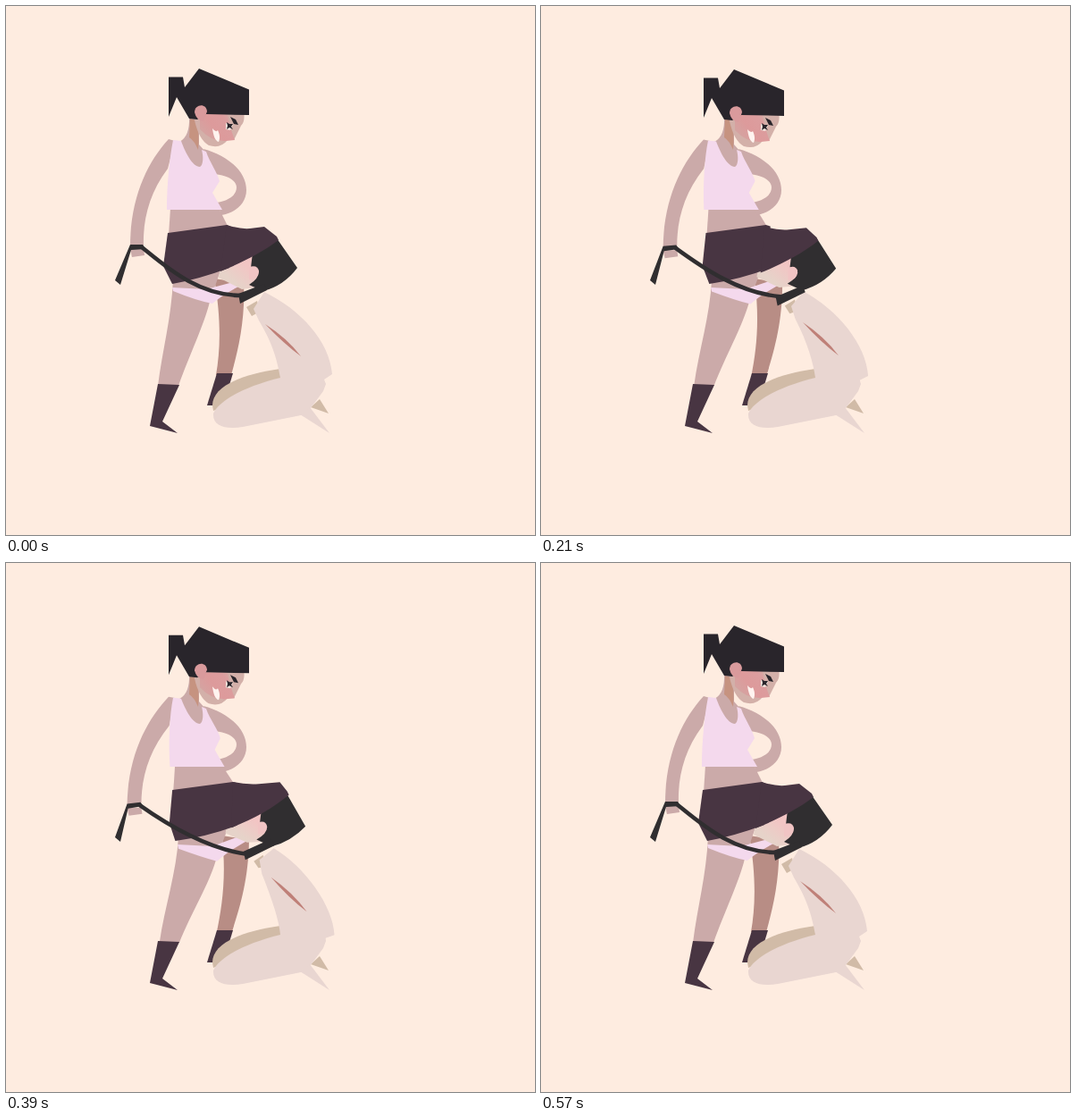
These frames come from a looping animation (592x592 px, 0.6 s). An HTML page:

```html
<!DOCTYPE html>
<html lang="en">
<head>
<meta charset="utf-8">
<style>
html, body { margin: 0; width: 100%; height: 100%; overflow: hidden; background: #feece0; }
svg { display: block; width: 100%; height: 100%; }
</style>
</head>
<body>
<svg id="stage" viewBox="0 0 592 592">
  <defs>
    <linearGradient id="blush" x1="0" y1="0.7" x2="1" y2="0.1">
      <stop offset="0" stop-color="#d3a5a2"/>
      <stop offset="0.4" stop-color="#dd9a9b"/>
      <stop offset="0.75" stop-color="#dc9d9e"/>
      <stop offset="1" stop-color="#d3b0a9"/>
    </linearGradient>
    <linearGradient id="cheek" x1="0" y1="1" x2="1" y2="0">
      <stop offset="0.25" stop-color="#e6d3c9"/>
      <stop offset="0.6" stop-color="#f2c5c4"/>
    </linearGradient>
  </defs>
</svg>
<script>
const LOOP = 600, STEP = 30;
const SKIN = '#cbaaa9', DARK = '#483542', HAIR = '#29252b', TOP = '#f4d9ed';
const PALE = '#e9d6d1', SHADE = '#d1bba7', BLACK = '#302e30';
const stage = document.getElementById('stage');
const parts = [];

function make(attrs, parent = stage) {
  const el = document.createElementNS('http://www.w3.org/2000/svg', 'path');
  for (const key in attrs) el.setAttribute(key, attrs[key]);
  parent.appendChild(el);
  return el;
}

const numbers = d => d.match(/-?[\d.]+/g).map(Number);

// A shape blends from one path to another, driven by the hips or the head;
// drop is how far it sinks while the head is low.
function shape(fill, from, to, driver = 'hips', { drop = 0, ...attrs } = {}) {
  const el = make({ d: from, fill, ...attrs });
  if (to) parts.push({ el, from, a: numbers(from), b: numbers(to), driver, drop });
}

// Far leg
shape('#b88d85', 'M233 305C241 350 240 385 235 413L252 413C260 385 268 350 266 310Z',
  'M243 305C248 350 242 385 236 413L253 413C262 385 272 355 273 310Z');
shape(DARK, 'M236 411L254 411L243 447L225 447Z');

// Near leg and underwear
shape(SKIN, 'M187 306C185 350 175 385 170 425L193 425C205 391 222 356 228 331L240 296Z',
  'M194 306C192 345 178 385 172 425L194 425C208 391 228 360 236 333L250 296Z');
shape(DARK, 'M170 423L194 424L175 465L192 478L161 470Z');
shape(TOP, 'M186 315L224 317L262 307L272 308Q245 321 231 333Q214 330 187 319Z',
  'M193 315L232 317L268 303L280 306Q252 320 237 334Q222 330 194 320Z');

// Torso and arms
shape(SKIN, 'M184 226L238 226L249 248L182 257Z', 'M190 226L242 226L257 248L188 257Z');
shape(SKIN, 'M182 149C158 175 139 215 139 269L154 269C153 240 160 210 181 182L189 151Z',
  'M182 150C158 175 136 215 135 271L151 271C151 240 160 210 183 182L189 151Z');
shape(SKIN, 'M139 272L141 281L155 279L154 272Z', 'M135 274L137 283L152 281L151 274Z');
shape(SKIN, 'M221 160C250 168 269 186 269 206C269 222 255 232 241 234L236 220C252 217 258 210 258 203C258 196 250 190 234 188Z');
shape(SKIN, 'M194 152Q206 146 205 124L216 126L216 155L224 164L220 181L211 181L199 168Z');
shape('#c69380', 'M206 126L213 128Q217 142 215 161Q211 151 205 147Z');
shape(TOP, 'M187 150L196 151C201 165 209 180 217 180C221 178 221 168 219 161L224 163C228 175 236 185 239 196L231 209L242 228L180 228C180 200 183 170 187 150Z',
  'M187 151L196 152C201 165 209 180 217 180C221 178 221 168 219 161L224 163C228 175 237 185 240 196L234 209L245 228L184 228C182 200 183 170 187 151Z');

// Kneeling figure's head
shape('url(#cheek)', 'M238 304L240 292L276 274L291 292L286 314L264 317Z',
  'M247 302L250 290L287 272L303 290L298 311L271 312Z', 'head');
shape(BLACK, 'M276 276L303 260L326 293Q311 313 288 319L272 312Q283 305 283 297Q281 291 274 293Z',
  'M288 275L316 257L337 295Q321 311 299 317L282 309Q294 303 294 295Q292 289 286 291Z', 'head');
shape('#f1c4c4', 'M272 292Q282 289 283 297Q282 306 272 306Z',
  'M284 290Q293 287 294 295Q293 303 284 303Z', 'head', { drop: 2 });

// Skirt: the waist follows the hips, the front flap rides on the head
shape(DARK, 'M181 254L247 245L252 247L250 293Q215 306 186 311L176 291Z',
  'M187 254L255 245L260 246L260 294Q225 307 190 311L184 291Z');
shape(DARK, 'M247 245Q262 250 273 249L289 247L303 258L305 262C285 277 262 288 240 297Z',
  'M255 245Q270 248 285 247L310 245L317 255L319 259C300 275 280 286 255 296Z', 'head', { drop: 2 });

// Kneeling figure's body
shape(SHADE, 'M231 447C231 425 265 412 307 406L310 422L232 453Z');
shape(SHADE, 'M341 449L351 440L361 456Z');
shape(SHADE, 'M269 337L281 330L284 342L275 347Z', 'M279 333L289 326L291 340L284 340Z', 'head');
shape(PALE, 'M289 320C330 340 362 375 365 412L356 418L358 423L355 431L341 450L330 458L265 471C245 474 231 470 232 456C238 442 266 426 307 416C304 400 300 380 283 352L277 339Z',
  'M302 319C335 340 367 385 368 417L358 420L358 423L355 431L341 450L330 458L265 471C245 474 231 470 232 456C238 442 266 426 307 416C306 400 297 375 287 347L285 331Z', 'head');
shape(PALE, 'M329 457L340 449L362 478Z');
shape('#bf8078', 'M290 356Q315 372 330 392Q311 378 290 356Z',
  'M298 351Q322 368 338 390Q318 375 298 351Z', 'head');

// Collar and leash
shape(BLACK, 'M260 322L289 311L292 318L262 333Z', 'M267 323L299 308L302 316L269 332Z', 'head', { drop: 3 });
shape('none', 'M152 270C177 290 215 325 265 324', 'M149 271C185 296 228 319 270 326', 'hips',
  { stroke: BLACK, 'stroke-width': 4.6 });
shape(BLACK, 'M139 267L153 267L156 272L140 273L128 312L122 307Z',
  'M135 270L150 268L153 272L136 275L128 312L122 307Z');

// Standing figure's head
const head = document.createElementNS('http://www.w3.org/2000/svg', 'g');
stage.appendChild(head);
[
  ['#d3b0a9', 'M213 116L266 118Q268 129 263 134L255 150L248 150Q240 160 227 156Q216 150 211 128Z'],
  ['url(#blush)', 'M217 121L248 121L251 136L256 150L246 151Q230 152 217 138Z'],
  [HAIR, 'M216 70L272 93.5L272 122L224 121L214 127L205 126L191 102L182 124L182 79.5L198 79.5L200 91Z'],
  ['#d99a9c', 'M211 119C211 110 224 108 225 118L221 129Q213 128 211 119Z'],
  ['#fff3ef', 'M231 137C232 145 234 151 238 152C240 148 239 143 237 139Q235 142 231 137Z'],
  ['#f4e6df', 'M246 131L254 133L251 139L246 138Z'],
  [HAIR, 'M247 130L250 132L254 132L252 135L254 138L250 136L247 138L248 134Z'],
  [HAIR, 'M251 124L257 127L260 133L255 132Z']
].forEach(([fill, d]) => make({ fill, d }, head));

function keyed(t, times, values) {
  const i = Math.max(1, times.findIndex(time => t <= time));
  const k = (t - times[i - 1]) / (times[i] - times[i - 1]);
  return values[i - 1] + (values[i] - values[i - 1]) * k;
}

function draw(now) {
  const t = Math.floor((now % LOOP) / STEP) * STEP;
  const pose = {
    hips: keyed(t, [0, 360, 570], [0, 1, 0]),
    head: keyed(t, [0, 90, 360, 570], [0, 0, 1, 0]) ** 1.2
  };
  const low = keyed(t, [0, 90, 210, 360, 570], [0, 1, 1, 0, 0]);
  for (const { el, from, a, b, driver, drop } of parts) {
    let i = 0;
    el.setAttribute('d', from.replace(/-?[\d.]+/g, () => {
      const value = a[i] + (b[i] - a[i]) * pose[driver];
      i++;
      return value.toFixed(2);
    }));
    if (drop) el.setAttribute('transform', `translate(0 ${(drop * low).toFixed(2)})`);
  }
  head.setAttribute('transform', `translate(0 ${(1.6 * pose.hips).toFixed(2)})`);
}

const start = performance.now();
function tick() {
  draw(performance.now() - start);
  requestAnimationFrame(tick);
}
draw(0);
requestAnimationFrame(tick);
</script>
</body>
</html>
```
